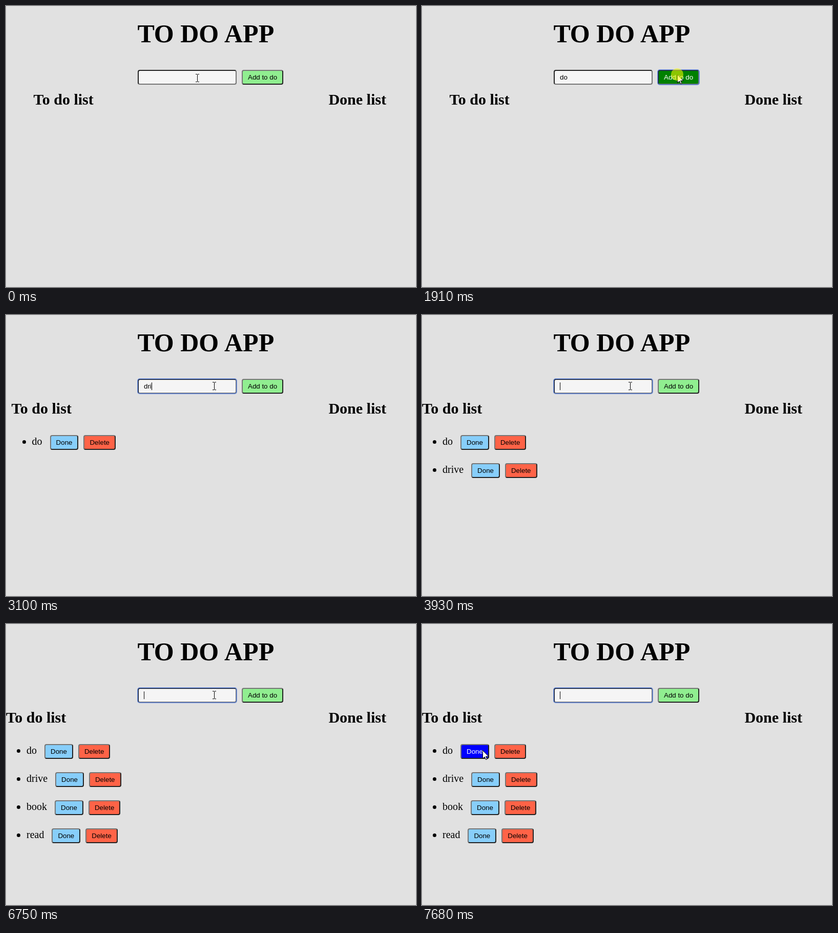
Recreate the animation shown at these times as an HTML page. Size 800 by 550 pixels, loop 7.99 s.

```html
<!DOCTYPE html>
<html lang="en">
<head>
<meta charset="utf-8">
<title>To do app</title>
<style>
  html, body { margin: 0; width: 100%; height: 100%; overflow: hidden; background: #e1e1e1; }
  #stage { position: relative; width: 800px; height: 550px; overflow: hidden; }
  svg { position: absolute; left: 0; top: 0; }
  svg text { font-family: "Liberation Serif", "Times New Roman", serif; font-weight: bold; }
  .box {
    position: relative; box-sizing: border-box; height: 29px; padding: 0 10px;
    border: 2px solid; border-color: #767676 #222 #222 #767676; border-radius: 4px;
    font: 13.333px/25px "Liberation Sans", Arial, sans-serif; white-space: pre; color: #000;
  }
  .inset { border-color: #222 #767676 #767676 #222; }
  .focus::after {
    content: ""; position: absolute; inset: -3px; border-radius: 5px;
    border: 2px solid rgba(60, 110, 225, .6);
  }
  #field { position: absolute; left: 257px; top: 125px; width: 193px; background: #f5f5f5; }
  #caret {
    display: inline-block; width: 1px; height: 15px; margin-right: -1px;
    vertical-align: -3px; background: #000;
  }
  #add { position: absolute; left: 460px; top: 125px; background: #90ee90; }
  #add.hover { background: #008000; color: #fff; }
  .item { position: absolute; display: flex; align-items: baseline; white-space: pre; }
  .item::before {
    content: ""; position: absolute; left: -19px; top: 9.5px;
    width: 7px; height: 7px; border-radius: 50%; background: #000;
  }
  .item > span { font: 20px/24px "Liberation Serif", "Times New Roman", serif; margin-right: 15px; }
  .done { background: #87cefa; margin-right: 10px; }
  .done.hover { background: #00f; color: #fff; }
  .delete { background: #ff6347; }
</style>
</head>
<body>
<div id="stage">
  <svg width="800" height="550">
    <text x="256.4" y="71" font-size="50">TO DO</text>
    <text x="426" y="71" font-size="50">APP</text>
    <text id="heading" y="193" font-size="30">To do list</text>
    <text x="629.4" y="193" font-size="30">Done list</text>
  </svg>
  <div id="field" class="box inset"><span id="typed"></span><span id="caret"></span></div>
  <div id="add" class="box">Add to do</div>
  <div id="list"></div>
  <svg width="800" height="550">
    <g id="pointer">
      <path id="beam" d="M-3 -8h3v1h1v-1h3v1h-3v14h3v1h-3v-1h-1v1h-3v-1h3v-14h-3z"/>
      <path id="arrow" d="M.5 .5V16.5L4.2 13L6.7 18.5L9 17.5L6.6 12.2H11.8Z" fill="#fff" stroke="#000"/>
      <circle id="press" r="12" fill="#ff0" fill-opacity=".55"/>
    </g>
  </svg>
</div>
<script>
  const LOOP = 7990, BLINK = 520;
  const $ = id => document.getElementById(id);

  const typing = [
    [0, ''], [770, 'd'], [820, 'do'], [1980, ''],
    [2580, 'd'], [3020, 'dr'], [3100, 'dri'], [3440, 'driv'], [3570, 'drive'], [3930, ''],
    [4980, 'b'], [5230, 'bo'], [5410, 'boo'], [5490, 'book'], [5840, ''],
    [5950, 'r'], [6050, 're'], [6260, 'rea'], [6490, 'read'], [6750, '']
  ];
  const tasks = [[1980, 'do'], [3930, 'drive'], [5840, 'book'], [6750, 'read']];
  const moves = [
    { from: 1340, to: 1820, x: 498, y: 134 },
    { from: 2080, to: 2370, x: 406, y: 139 },
    { from: 7090, to: 7680, x: 118, y: 247 }
  ];
  const presses = [[30, 140], [1850, 1980], [2380, 2440]];
  const caretResets = [40, 2380, 7660, ...typing.slice(1).map(k => k[0])].sort((a, b) => a - b);
  const listX = [53.5, 10.6, 0];

  const within = (t, [a, b]) => t >= a && t < b;
  const last = (arr, ok) => arr.filter(ok).pop();
  const ease = p => p * p * (3 - 2 * p);
  const inside = (p, x, y, w, h) => p.x >= x && p.x < x + w && p.y >= y && p.y < y + h;

  const rows = tasks.map(([, name], i) => {
    const row = document.createElement('div');
    row.className = 'item';
    row.style.top = 235 + 55 * i + 'px';
    row.innerHTML = `<span>${name}</span><div class="box done">Done</div><div class="box delete">Delete</div>`;
    $('list').append(row);
    return row;
  });

  function pointerAt(t) {
    let x = 373, y = 141;
    for (const m of moves) {
      const p = ease(Math.min(1, Math.max(0, (t - m.from) / (m.to - m.from))));
      x += (m.x - x) * p;
      y += (m.y - y) * p;
    }
    return { x: Math.round(x), y: Math.round(y) };
  }

  function draw(t) {
    const pos = pointerAt(t);
    const pressed = presses.some(p => within(t, p));
    const addFocus = within(t, [1850, 2380]);
    const fieldFocus = t >= 30 && !addFocus;

    $('typed').textContent = last(typing, k => k[0] <= t)[1];
    const since = t - (last(caretResets, r => r <= t) ?? t);
    $('caret').style.visibility = fieldFocus && since % (2 * BLINK) < BLINK ? 'visible' : 'hidden';
    $('field').classList.toggle('focus', fieldFocus);

    const overAdd = inside(pos, 460, 125, 81, 29);
    $('add').classList.toggle('hover', overAdd);
    $('add').classList.toggle('inset', overAdd && pressed);
    $('add').classList.toggle('focus', addFocus);

    const count = tasks.filter(k => k[0] <= t).length;
    const left = listX[Math.min(count, 2)];
    $('heading').setAttribute('x', left);
    rows.forEach((row, i) => {
      row.style.display = i < count ? 'flex' : 'none';
      row.style.left = left + 40 + 'px';
    });
    rows[0].children[1].classList.toggle('hover', inside(pos, 75, 235, 56, 29));

    const overField = inside(pos, 257, 125, 193, 29);
    $('pointer').setAttribute('transform', `translate(${pos.x} ${pos.y})`);
    $('beam').style.display = overField ? '' : 'none';
    $('arrow').style.display = overField ? 'none' : '';
    $('press').style.display = pressed ? '' : 'none';
  }

  const start = performance.now();
  function tick() {
    draw((performance.now() - start) % LOOP);
    requestAnimationFrame(tick);
  }
  tick();
</script>
</body>
</html>
```
